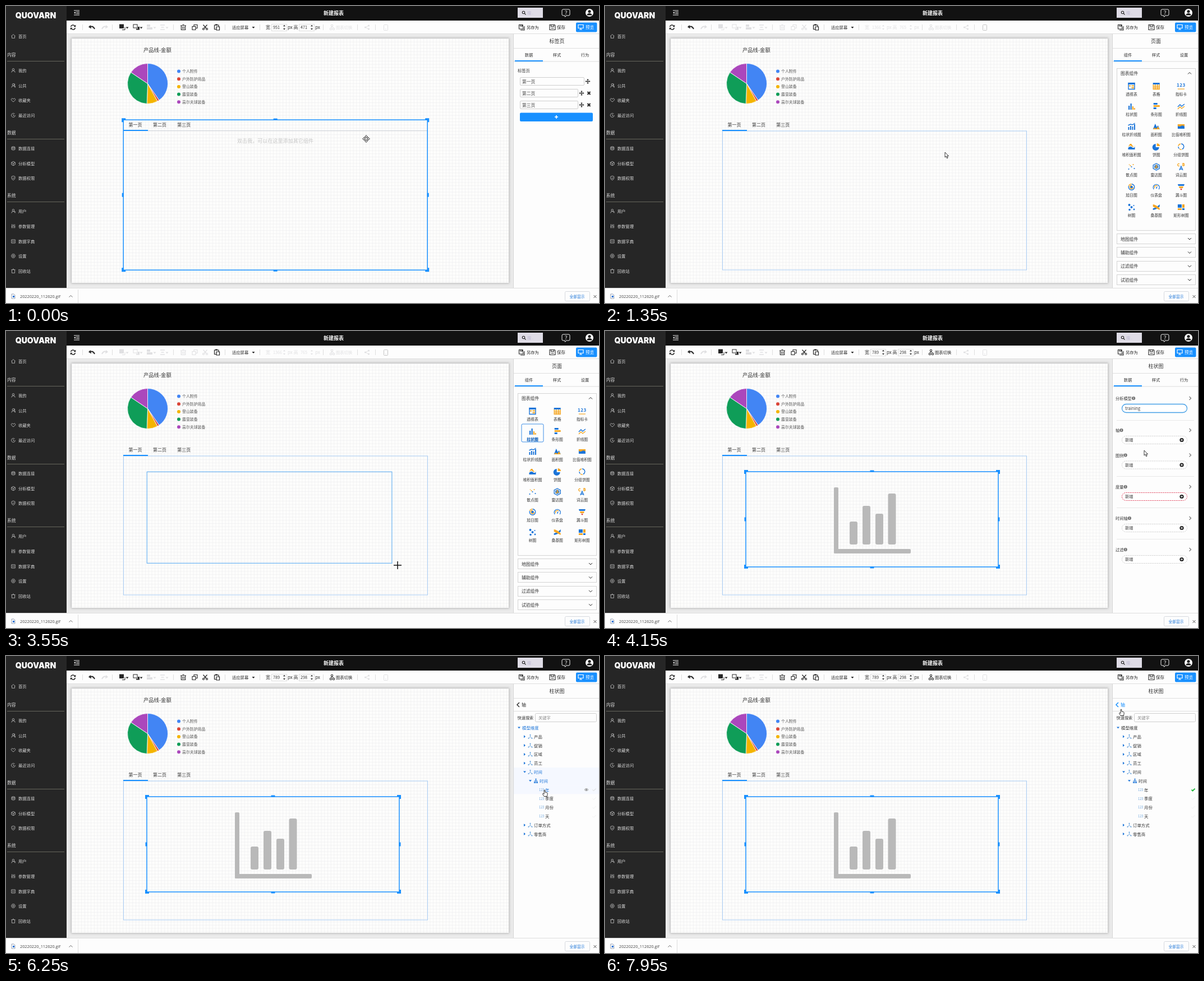
These frames come from a looping animation (1057 px wide and 530 px high, 8000 ms). An HTML page:

```html
<!DOCTYPE html>
<html>
<head>
<meta charset="utf-8">
<title>新建报表</title>
<style>
html, body { margin: 0; width: 100%; height: 100%; overflow: hidden; background: #fdfdfd; }
svg { display: block; width: 1057px; height: 530px; font-family: "Noto Sans CJK SC", "Noto Sans CJK", "Noto Sans", sans-serif; }
text { white-space: pre; }
</style>
</head>
<body>
<svg id="stage" viewBox="0 0 1057 530"></svg>
<script>
const BLUE = '#1890ff', INK = '#262626', OFF = '#e0e0e2', LINE = '#dedede';
const DEEP = '#1b74d8', GOLD = '#f5a623';

const text = (x, cy, s, size = 7.3, fill = '#333', extra = '') =>
  `<text x="${x}" y="${cy + size * .37}" font-size="${size}" fill="${fill}" ${extra}>${s}</text>`;
const mid = (x, cy, s, size, fill, extra = '') => text(x, cy, s, size, fill, 'text-anchor="middle" ' + extra);
const rect = (x, y, w, h, fill, extra = '') =>
  `<rect x="${x}" y="${y}" width="${w}" height="${h}" fill="${fill}" ${extra}/>`;
const box = (x, y, w, h, stroke, extra = '') =>
  rect(x + .5, y + .5, w - 1, h - 1, 'none', `stroke="${stroke}" ${extra}`);
const dot = (x, y, r, fill, extra = '') => `<circle cx="${x}" cy="${y}" r="${r}" fill="${fill}" ${extra}/>`;
const line = (x, y, d, c, w = 1) => `<path transform="translate(${x} ${y})" d="${d}" fill="none" stroke="${c}" stroke-width="${w}"/>`;
const fill = (x, y, d, c, extra = '') => `<path transform="translate(${x} ${y})" d="${d}" fill="${c}" ${extra}/>`;
const hr = (x, y, w, c = LINE) => rect(x, y, w, 1, c);
const vr = (x, y, h, c = LINE) => rect(x, y, 1, h, c);
const ring = (r, x = 0, y = 0) => `M${x - r} ${y}a${r} ${r} 0 1 0 ${2 * r} 0a${r} ${r} 0 1 0 ${-2 * r} 0`;
const UP = 'M-3 1.5L0-1.5 3 1.5', DOWN = 'M-3-1.5L0 1.5 3-1.5', NEXT = 'M-1.5-3L1.5 0-1.5 3';
const CARET = 'M-2.5-1.5h5L0 1.5z', CROSS = 'M-2.5-2.5l5 5M2.5-2.5l-5 5', TICK = 'M-3 0L-1 2 3-2';
const PERSON = ring(1.8, 0, -1.6) + 'M-3.2 3.5q0-3 3.2-3t3.2 3';

function sidebar() {
  const items = [
    [54, '首页', 'M-3.5 0L0-3.5 3.5 0M-2.5-1V3.3H2.5V-1'],
    [115, '我的', PERSON],
    [142, '公共', PERSON + 'M1.5-3.5q2 .5 1 3L3.5 3'],
    [168, '收藏夹', 'M0 3Q-6-1-2.5-3Q-.8-3.4 0-1.6Q.8-3.4 2.5-3Q6-1 0 3z'],
    [195, '最近访问', 'M2.5-2.5a3.5 3.5 0 1 0 1 2.5M0-2V.3L2 1'],
    [254, '数据连接', 'M-3-2.2q3-2 6 0V2.2q-3 2-6 0zM-3-2.2q3 2 6 0M-3 0q3 2 6 0'],
    [281, '分析模型', 'M0-3.7L3.3-1.8V2L0 3.7-3.3 2V-1.8zM-3.3-1.8L0 0 3.3-1.8M0 0V3.7'],
    [307, '数据权限', 'M0-3.7L3-2.6V0Q3 2.5 0 3.7Q-3 2.5-3 0V-2.6zM-1.3 0L0 1.2 1.5-1'],
    [366, '用户', PERSON + 'M2 0l2 2'],
    [393, '参数管理', 'M-2.5-3.5v7M0-3.5v7M2.5-3.5v7M-3.5 1h2M-1-1.5h2M1.5 1h2'],
    [420, '数据字典', 'M-3.3-3h6.6v6h-6.6zM-1.2-1.5v3M1.2-1.5v3'],
    [446, '设置', 'M-1.7-3.2h3.4L3.6 0 1.7 3.2h-3.4L-3.6 0z' + ring(1.3)],
    [473, '回收站', 'M-3.5-2.4h7M-2.6-2.4V3.4H2.6V-2.4M-1-3.6h2']
  ];
  return rect(0, 0, 108, 503, '#262626')
    + mid(53, 17, 'QUOVARN', 14, '#fff', 'font-weight="900" style="font-family:Inter,sans-serif"')
    + items.map(([y, s, d]) => line(13, y, d, '#c4c4c4', .8) + text(22, y, s, 7.3, '#d8d8d8')).join('')
    + [[87, '内容'], [226, '数据'], [338, '系统']].map(([y, s]) =>
      text(2, y, s, 7.8, '#d8d8d8') + hr(2, y + 11, 102, '#66665c')).join('');
}

function header() {
  return rect(108, 0, 949, 26, '#121212')
    + line(126, 12, 'M-5-4H5M-1-1.3H5M-1 1.3H5M-5 4H5', '#eee')
    + fill(126, 12, 'M-5 0l2.8-2v4z', '#eee')
    + mid(584, 12.5, '新建报表', 9, '#fff', 'font-weight="bold"')
    + rect(912, 3, 45, 18, '#dfdce6')
    + line(922.5, 11.5, ring(2.2) + 'M1.6 1.6L4 4', '#222', 1.1) + text(929, 12, '搜..', 7.3, '#bdb8d2')
    + line(998, 12, 'M-5-6H5q2 0 2 2V3q0 2-2 2H1L-1.5 7.5-2 5H-5q-2 0-2-2V-4q0-2 2-2z', '#eee')
    + mid(998, 11.8, '?', 10, '#eee')
    + dot(1040, 12, 7, '#fff') + dot(1040, 9.7, 2.5, '#121212')
    + fill(1040, 12, 'M-4.5 4.5q0-3.5 4.5-3.5t4.5 3.5z', '#121212');
}

function footer() {
  return rect(0, 503, 1057, 27, '#fdfdfd') + hr(0, 503, 1057)
    + fill(13, 518, 'M-3-4h4l2 2v6h-6z', '#fff', 'stroke="#7f8ca3" stroke-width=".8"') + rect(12, 517, 3, 3, DEEP)
    + text(25, 518.5, '20220220_112620.gif', 7.3, '#444', 'style="font-family:\'Open Sans\',sans-serif"')
    + line(115.5, 518, UP, '#666') + vr(128, 506, 24)
    + box(996, 509, 45, 18, '#d6d9de', 'rx="2"') + mid(1018, 518.5, '全部显示', 6.8, DEEP)
    + line(1050, 518.5, CROSS, '#555');
}

function pie() {
  const at = a => { const r = a * Math.PI / 180; return `${252.5 + 36 * Math.sin(r)} ${138.5 - 36 * Math.cos(r)}`; };
  const parts = [['个人附件', 145.5, '#4285f4'], ['户外防护用品', 151, '#db4437'], ['登山装备', 182, '#f4b400'],
    ['露营装备', 304, '#0f9d58'], ['高尔夫球装备', 359.99, '#ab47bc']];
  let from = 0;
  return text(245, 79, '产品线-金额', 9.3, '#333') + parts.map(([s, to, c], i) => {
    const d = `M252.5 138.5L${at(from)}A36 36 0 0 1 ${at(to)}z`, y = 116.5 + i * 13.7;
    from = to;
    return fill(0, 0, d, c, 'stroke="#fff" stroke-width=".8"') + dot(308, y, 3, c) + text(314, y, s, 6.9, '#555');
  }).join('');
}

function canvasArea() {
  return `<defs><pattern id="grid" x="117" y="58" width="5.7" height="5.7" patternUnits="userSpaceOnUse">
    <path d="M0 .3H5.7M.3 0V5.7" stroke="#e8e8ea" stroke-width=".6"/></pattern>
    <filter id="soft"><feGaussianBlur stdDeviation="2"/></filter></defs>`
    + rect(108, 50, 796, 453, '#ebebeb')
    + rect(116, 57, 781, 438, '#b5b5b5', 'filter="url(#soft)"')
    + rect(117, 58, 779, 436, '#fdfdfc') + rect(117, 58, 779, 436, 'url(#grid)')
    + pie()
    + ['第一页', '第二页', '第三页'].map((s, i) => text(218.5 + i * 43.4, 212.5, s, 8, '#333')).join('');
}

function frame(x, y, x2, y2) {
  const cx = (x + x2) / 2, cy = (y + y2) / 2;
  const corner = (px, py, sx, sy) => `<path transform="translate(${px} ${py}) scale(${sx} ${sy})" d="M-3-3H4V0H0V4H-3z" fill="${BLUE}"/>`;
  return rect(x, y, x2 - x, y2 - y, 'none', `stroke="${BLUE}" stroke-width="1.5"`)
    + corner(x, y, 1, 1) + corner(x2, y, -1, 1) + corner(x, y2, 1, -1) + corner(x2, y2, -1, -1)
    + [y - 2.5, y2 - .5].map(v => rect(cx - 3.5, v, 7, 3, BLUE)).join('')
    + [x - 2.5, x2 - .5].map(v => rect(v, cy - 3.5, 3, 7, BLUE)).join('');
}

function toolbar(edit, swap, w, h) {
  const e = edit ? INK : OFF, s = swap ? INK : OFF, f = edit ? '#333' : OFF;
  const field = (x, v) => (edit ? box(x, 32, 28, 13, LINE) : '') + text(x + 3, 38.5, v, 7.2, f)
    + fill(x + 23, 36.2, 'M-2 0h4L0-2.5z', e) + fill(x + 23, 40, 'M-2 0h4L0 2.5z', e);
  const seps = [136, 189, 298, 390, 452, 565, 626, 658].map(x => vr(x, 33, 10)).join('');
  return rect(108, 26, 949, 24, '#fdfdfd') + hr(108, 49, 949) + seps
    + line(119.5, 38, 'M-4-1a4 4 0 0 1 7-1.5M4 1a4 4 0 0 1-7 1.5', INK, 1.5) + fill(119.5, 38, 'M4.8-4.5V-.8H1zM-4.8 4.5V.8H-1z', INK)
    + line(153, 38, 'M-3-1Q2-3 5 3', INK, 2) + fill(153, 38, 'M-6-.5L-2.5-4-1 2.5z', INK)
    + line(176, 38, 'M3-1Q-2-3-5 3', OFF, 2) + fill(176, 38, 'M6-.5L2.5-4 1 2.5z', OFF)
    + rect(202, 32.5, 8, 7.5, e) + line(211, 40, 'M1-2V2.5H-4', e) + fill(216, 39, CARET, e)
    + box(226.5, 32.5, 8, 7, e) + fill(236, 40, 'M-1-3H2V2.5H-4V.5H-1z', e) + fill(241, 39, CARET, e)
    + rect(251, 33, 6, 4, OFF) + rect(251, 38, 10, 4, OFF) + fill(265, 39, CARET, OFF)
    + line(279, 38, 'M-4-4H4M-2.5 0H2.5M-4 4H4', OFF, 1.3) + fill(287, 39, CARET, OFF)
    + line(316, 38, 'M-5-3H5M-3.7-3V4.5H3.7V-3M-1.5-4.7h3M-1.3-1V3M1.3-1V3', e, 1.1)
    + line(336.5, 38, 'M-4.5-1.5H1.5V4.5H-4.5zM-1.5-2V-4.5H4.5V1.5H2', e, 1.1)
    + line(355, 38, 'M-3.5-4.5L2 2M3.5-4.5L-2 2' + ring(1.5, -3, 3) + ring(1.5, 3, 3), e, 1.2)
    + line(376, 38, 'M-1 3.5H-4.5V-4H3V-1.5M-1-1H4.5V5H-1z', INK, 1.2) + rect(373, 32.5, 4, 2, INK)
    + text(403, 38, '适应屏幕', 7.3, '#333') + fill(441, 38.5, CARET, INK)
    + text(463, 38, '宽', 8, f) + field(473, w) + text(502, 38, 'px', 8, f)
    + text(512.5, 38, '高', 8, f) + field(522, h) + text(551, 38, 'px', 8, f)
    + line(581, 38, 'M-3.5 1.5h3v3h-3zM1.5 1.5h3v3h-3zM-1.5-4.5h3v3h-3zM0-1.5L-2 1.5M0-1.5L3 1.5', s)
    + text(588, 38, '图表切换', 7.3, s)
    + line(643.5, 38, 'M3-3L-3 0 3 3', OFF) + dot(646.5, 35, 1.6, OFF) + dot(640.5, 38, 1.6, OFF) + dot(646.5, 41, 1.6, OFF)
    + box(673, 33, 8, 11, edit ? OFF : '#c4c4c4', 'rx="1"') + dot(677, 41, .8, OFF)
    + line(919, 38, 'M-4.5-4.5H2L3 3H-4.5zM-2-4.5V-2H1V-4.5M-2 5H5V-2', INK, 1.1) + text(928, 38, '另存为', 7.3, INK)
    + line(974, 38, 'M-5-4.5H4L5-3V4.5H-5zM-2.5-4.5V-1.5H2.5V-4.5M-2.5 1.5H2.5', INK, 1.1) + text(982, 38, '保存', 7.5, INK)
    + rect(1016, 29.5, 37.5, 17, BLUE, 'rx="2"')
    + line(1024.5, 37.5, 'M-4.5-4H4.5V2H-4.5zM0 2V4.5M-2.5 4.5H2.5', '#fff', 1.2) + text(1033, 38, '预览', 7.5, '#fff');
}

const panelTop = (title, tabs) => mid(982, 63, title, 9, '#333') + hr(905, 75, 152)
  + (tabs ? tabs.map((s, i) => mid(932 + i * 50, 87, s, 7.3, '#333')).join('') + hr(905, 98.5, 152) + rect(907, 97, 50, 2, BLUE) : '');

function tabPanel() {
  const move = (x, y) => line(x, y, 'M-3.5 0H3.5M0-3.5V3.5', INK, 1.2)
    + fill(x, y, 'M0-4.5l1.8 2h-3.6zM0 4.5l1.8-2h-3.6zM-4.5 0l2-1.8v3.6zM4.5 0l-2-1.8v3.6z', INK);
  return panelTop('标签页', ['数据', '样式', '行为']) + text(912, 115, '标签页', 7.3, '#333')
    + ['第一页', '第二页', '第三页'].map((s, i) => {
      const y = 127 + i * 21;
      return box(916, y, i ? 104 : 115, 15, '#cfcfcf', 'rx="1.5"') + text(920, y + 8, s, 7.8, '#444')
        + move(i ? 1026 : 1037, y + 7.5) + (i ? line(1039, y + 7.5, CROSS, INK, 2) : '');
    }).join('')
    + rect(916, 190.5, 130, 15.5, BLUE, 'rx="2"') + line(981, 198, 'M-3 0H3M0-3V3', '#fff', 1.6);
}

// label, blue fill, gold fill, blue stroke, gold stroke
const CHARTS = [
  ['透视表', 'M-6-6H6v3H-6z', 'M-4.5-1.5h3v2h-3zM0-1.5h4.5v2H0zM0 2h4.5v2H0z', 'M-5.5-5.5H5.5V5.5H-5.5z'],
  ['表格', 'M-6-6H6v3H-6z', '', '', 'M-5.5-3V5.5H5.5V-3M-5.5 0H5.5M-5.5 3H5.5M-2-3V5.5M2-3V5.5'],
  ['指标卡', '', 'M-6 4.5H6v1.2H-6z'],
  ['柱状图', 'M-2-5h2.2V6h-2.2zM-5.5-1h2.2v7h-2.2z', 'M1.3 0h2.2v6H1.3zM4.3 3h2v3h-2z'],
  ['条形图', 'M-5-6h7v3h-7zM-5 2h5v3h-5z', 'M-5-2H6v3H-5z'],
  ['折线图', '', '', 'M-6 1L-2-3 1 0 6-4', 'M-6 5L-2 1 1 4 6 0'],
  ['柱状折线图', 'M-6 1h2v5h-2zM-2.5-1h2v7h-2zM1 0h2v6H1zM4.5-4h2V6h-2z', '', 'M-6-2L-2-4 2-3 6-6'],
  ['面积图', 'M-6 5L-2-5 1 1 3-2 6 5z', 'M-6 5L-3 2 0 4 3 0 6 5z'],
  ['比值堆积图', 'M-6-4H6V4H-6z', 'M-6-4H6V0Q3-3 0-1T-6-1z'],
  ['堆积面积图', 'M-6 5V2Q-2-2 1 1T6 0V5z', 'M-6 1Q-2-9 1-3T6-2V-1Q3 2 0-1T-6 1z'],
  ['饼图', 'M-1-5A6 6 0 1 0 5 1H-1z', 'M1-6A6 6 0 0 1 6.5-1H1z'],
  ['分组饼图', '', '', 'M0-5a5 5 0 0 1 2 9.5M-3.5 3.5A5 5 0 0 1-5 0', 'M-5-1A5 5 0 0 1-1-5M1 5A5 5 0 0 1-3 4'],
  ['散点图', ring(1.1, -5, 4) + ring(1.1, 0, 0) + ring(1.1, 5, 3), ring(1, -2, -2) + ring(1, 3, -4) + ring(.8, -4, -4)],
  ['雷达图', 'M0-4L3.5-2V2L0 4-3.5 2V-2z', '', 'M0-6L5.5-3V3L0 6-5.5 3V-3z', 'M0-3L2 1-2 2z'],
  ['词云图', '', '', 'M-3 6L0-1 3 6M-2 4H2', 'M-3-2a2 2 0 1 1 0-3M3-6v4h2q1.5-1 0-2 1-1 0-2z'],
  ['旭日图', 'M-2-2h4v4h-4z', '', 'M0-5.3a5.3 5.3 0 1 1-5 3.5', 'M-5-2A5.3 5.3 0 0 1 0-5.3M3 0a3 3 0 1 1-3-3'],
  ['仪表盘', 'M-1 2L2-2 1 3z', '', 'M-4.5 4A5.5 5.5 0 1 1 4.5 4', 'M-3 2A3.3 3.3 0 0 1 2-2'],
  ['漏斗图', 'M-6-5H6L5-2H-5z', 'M-4-1H4L3 2H-3z'],
  ['树图', ring(2, -4, -4) + ring(2, 0, 0) + ring(1.8, -3.5, 4.5) + ring(1.4, 4.5, 4) + ring(1.1, 4, -3)],
  ['桑基图', 'M-6 5V2Q0 1 6-5V-1Q1 4-6 5z', 'M-6-5Q0-4 6 2V5Q0 2-6-1z'],
  ['矩形树图', 'M-6-5H1V1H-6zM2 2H6V5H2z', 'M2-5H6V1H2zM-6 2H1V5H-6z']
];

function pagePanel() {
  return panelTop('页面', ['组件', '样式', '设置'])
    + box(912, 111, 141, 290, '#d4d4d4') + text(919, 120, '图表组件', 7.8) + line(1042, 120, UP, INK)
    + CHARTS.map(([s, b, o, bs, os], i) => {
      const x = 938.5 + i % 3 * 44.2, y = 143 + Math.floor(i / 3) * 36;
      return fill(x, y, b, DEEP) + fill(x, y, o || '', GOLD) + line(x, y, bs || '', DEEP, 1.4) + line(x, y, os || '', GOLD, 1.3)
        + (i == 2 ? mid(x, y - 2, '123', 8, DEEP, 'font-weight="bold" letter-spacing=".5"') : '')
        + mid(x, y + 14, s, 6.8, '#333');
    }).join('')
    + fill(1027, 323, 'M-2 3H2L0 6z', '#d63b3b')
    + ['地图组件', '辅助组件', '过滤组件', '试验组件'].map((s, i) => {
      const y = 406 + i * 24.4;
      return box(912, Math.round(y), 141, 19, '#d4d4d4') + text(919, y + 9.8, s, 7.8) + line(1042, y + 9.5, DOWN, INK);
    }).join('');
}

function chartPanel() {
  const head = (y, s) => {
    const x = 910 + s.length * 7.2 + 3.3;
    return text(910, y + .5, s, 7.2) + dot(x, y, 3.1, '#707070') + rect(x - .5, y - .5, 1, 2.3, '#fff') + rect(x - .5, y - 2, 1, 1, '#fff')
      + line(1043, y, NEXT, '#777', 1.2);
  };
  const rows = [[177, '轴'], [221.5, '图例'], [278, '度量'], [334, '时间轴'], [390, '过滤']];
  return panelTop('柱状图', ['数据', '样式', '行为']) + head(120, '分析模型')
    + rect(921.5, 130.5, 116, 15, '#fff', 'rx="7.5" stroke="#46a0e6" stroke-width="1.3"') + text(927, 138, 'training', 7.5, '#444')
    + [159, 259, 315, 371].map(y => hr(912, y, 138, '#e8e8e8')).join('')
    + rows.map(([y, s], i) => head(y, s)
      + rect(921.5, y + 10.5, 116, 14, '#fff', `rx="7" stroke="${i == 2 ? '#e0405a' : '#ccc'}" stroke-dasharray="2 1.3"`)
      + text(927, y + 17.5, '新增', 7.3) + dot(1028, y + 17.5, 3.6, '#1c1c1c') + line(1028, y + 17.5, 'M-2 0H2M0-2V2', '#fff')).join('');
}

const TREE = [['模型维度', 0], ['产品', 1], ['促销', 1], ['区域', 1], ['员工', 1], ['时间', 1], ['时间', 2],
  ['年', 3], ['季度', 3], ['月份', 3], ['天', 3], ['订单方式', 1], ['零售商', 1]];
const OPEN_DIM = 5050, OPEN_LEVELS = 5450, CHECKED = 6700;

function axisPanel(t, [cx, cy]) {
  const rows = TREE.filter(r => r[1] < 2 || t >= (r[1] == 2 ? OPEN_DIM : OPEN_LEVELS));
  const hot = cx > 911 && cy > 120 ? Math.floor((cy - 120.1) / 15.8) : -1;
  const lit = new Set();
  if (hot >= 0 && hot < rows.length)
    for (let i = hot, depth = 9; i >= 0; i--)
      if (rows[i][1] < depth) { lit.add(i); depth = rows[i][1]; }
  const back = cy < 99 && cx > 906 ? BLUE : '#333';
  return panelTop('柱状图') + line(913, 87, 'M2-4L-2 0 2 4', back, 1.5) + text(919, 87.5, '轴', 8, back) + hr(905, 98, 152)
    + text(911.5, 110, '快速搜索', 7.2) + box(943, 102, 110, 16, '#cfcfcf', 'rx="2"') + text(949, 110.5, '关键字', 7.3, '#888')
    + rows.map(([s, d], i) => {
      const y = 128 + i * 15.8, on = lit.has(i), x = 934.5 + (d - 1) * 10;
      const open = d == 0 || d == 2 && t >= OPEN_LEVELS || d == 1 && i == 5 && t >= OPEN_DIM;
      let out = on && d ? rect(905, y - 8, 152, 15.8, '#f5f8ff') : '';
      if (d < 3) out += fill(914.5 + d * 10, y, open ? CARET : 'M-1.5-2.5v5L1.5 0z', DEEP);
      if (d == 1) out += line(x, y, 'M0-2.5V.5L-2.5 2.5M0 .5L2.5 2.5', '#6ba4dc', .9)
        + [[0, -3], [-3, 3], [3, 3]].map(p => dot(x + p[0], y + p[1], 1.1, '#6ba4dc')).join('');
      if (d == 2) out += line(x, y, 'M0-2V0M-2.5 2V0H2.5V2M0 0V2', DEEP, .9)
        + [[0, -3], [-2.5, 3], [0, 3], [2.5, 3]].map(p => rect(x + p[0] - 1, y + p[1] - 1, 2, 2, DEEP)).join('');
      if (d == 3) {
        const done = i == 7 && t >= CHECKED;
        out += text(950, y, '123', 5.7, '#6ba4dc') + line(1048.5, y, TICK, done ? '#1fb83a' : on ? '#d4d4d4' : '#f0f0f0', done ? 2 : 1);
        if (on) out += line(1034.5, y, 'M-3.5 0Q0-4 3.5 0Q0 4-3.5 0z', '#888', .9) + dot(1034.5, y, 1.4, '#888');
      }
      return out + text(d ? 931 + d * 10 : 920, y + .3, s, 7.4, on ? DEEP : '#333');
    }).join('');
}

function chartGhost() {
  const bars = [[436, 340], [459, 312], [482, 326], [504.5, 290]];
  return rect(408, 279, 8, 118, '#b9b9b9', 'rx="2"') + rect(408, 389, 137, 8, '#b9b9b9', 'rx="2"')
    + bars.map(([x, y]) => rect(x, y, 14, 381 - y, '#b9b9b9', 'rx="3"')).join('');
}

const EDGE = 'stroke="#222" stroke-width=".9"';
const CURSORS = {
  move: fill(0, 0, 'M0-6.5l2.5 3H1V-1H3.5V-2.5L6.5 0l-3 2.5V1H1V3.5H2.5L0 6.5-2.5 3.5H-1V1H-3.5V2.5L-6.5 0l3-2.5V-1H-1V-3.5H-2.5z', '#fff', EDGE),
  arrow: fill(0, 0, 'M0 0V9L2 7.2 3.6 10.8 5.2 10 3.7 6.7H6.5z', '#fff', EDGE),
  hand: fill(0, 0, 'M-.9.6Q0-.6.9.6V4L4.5 5Q5.5 5.3 5.2 7L4.5 11.5H-1L-3.5 7.5Q-3.5 6-2 6.5L-.9 7.5z', '#fff', EDGE),
  cross: line(0, 0, 'M-7 0H7M0-7V7', '#111', 1.5)
};

// time, x, y, and 1 where the move into the point is uniform
const TRACK = [[50, 642, 237], [850, 606, 261], [1350, 606, 261], [1750, 938, 183], [1950, 938, 183], [2300, 483, 262],
  [2450, 483, 262], [2800, 251, 251], [2950, 251, 251], [3550, 698, 418, 1], [3600, 701, 421, 1], [3750, 701, 421],
  [4150, 961, 213], [4450, 1028, 194], [4600, 1028, 194], [5000, 924, 206], [5100, 924, 206], [5400, 934, 221], [5500, 934, 221],
  [5800, 958, 234], [6250, 960, 239], [6700, 960, 239], [7200, 909, 195], [7450, 909, 150], [7750, 920, 84], [7950, 920, 95]];

function pointer(t) {
  const i = TRACK.findIndex(k => k[0] >= t);
  if (i < 1) return TRACK[i ? TRACK.length - 1 : 0].slice(1, 3);
  const [t0, x0, y0] = TRACK[i - 1], [t1, x1, y1, even] = TRACK[i];
  const u = (t - t0) / (t1 - t0), k = even ? u : u * u * (3 - 2 * u);
  return [x0 + (x1 - x0) * k, y0 + (y1 - y0) * k];
}

const ENTER = 1000, PICK = 1950, DRAG = 2950, DROP = 3700, AXIS = 4600;

function cursorKind(t, x) {
  if (t < ENTER) return 'move';
  if (t < DROP && x > 904) return 'hand';
  if (t >= PICK && t < DROP) return 'cross';
  return t >= 4350 ? 'hand' : 'arrow';
}

const stage = document.getElementById('stage');
const layer = (id, html) => `<g id="${id}">${html}</g>`;
const inner = box(209, 222.5, 543, 249, '#a9cdf5') + rect(209, 221, 44, 2, BLUE);
stage.innerHTML = canvasArea()
  + layer('tabMode', hr(209, 222, 542, '#d0d4da') + rect(209, 221, 44, 2, BLUE) + frame(209.2, 203.2, 751.2, 471.2)
    + mid(480, 241, '双击我，可以在这里添加其它组件', 9.07, '#c6c6c6') + toolbar(true, false, '951', '471'))
  + layer('pageMode', inner + toolbar(false, false, '1366', '765'))
  + layer('chartMode', inner + frame(251, 251, 701, 421) + chartGhost() + toolbar(true, true, '789', '298'))
  + rect(904, 50, 153, 453, '#fdfdfd') + vr(904, 50, 453, '#d6d6d6')
  + layer('tabPanel', tabPanel()) + layer('pagePanel', pagePanel()) + layer('chartPanel', chartPanel()) + layer('axisPanel', '')
  + layer('picked', box(918.5, 165.5, 40, 33, '#3d8ee6', 'rx="2"') + mid(938.5, 193, '柱状图', 6.8, DEEP, 'font-weight="bold"'))
  + layer('drag', '') + sidebar() + header() + footer() + layer('cursor', '');

const $ = id => document.getElementById(id);
const show = (id, on) => { $(id).style.display = on ? '' : 'none'; };

function render(t) {
  const [x, y] = pointer(t);
  const page = t >= ENTER && t < DROP;
  show('tabMode', t < ENTER);
  show('tabPanel', t < ENTER);
  show('pageMode', page);
  show('pagePanel', page);
  show('picked', page && t >= PICK);
  show('chartMode', t >= DROP);
  show('chartPanel', t >= DROP && t < AXIS);
  $('axisPanel').innerHTML = t >= AXIS ? axisPanel(t, [x, y]) : '';
  const [dx, dy] = pointer(t - 14);
  $('drag').innerHTML = t > DRAG && t < DROP ? rect(251.3, 251.3, dx - 251, dy - 251, 'none', 'stroke="#6db4f2" stroke-width="1.2"') : '';
  $('cursor').innerHTML = CURSORS[cursorKind(t, x)];
  $('cursor').setAttribute('transform', `translate(${x} ${y})`);
}

const start = performance.now();
let last = -1;
function tick() {
  const t = Math.floor((performance.now() - start) % 8000 / 50) * 50;
  if (t !== last) render(last = t);
  requestAnimationFrame(tick);
}
tick();
</script>
</body>
</html>
```
